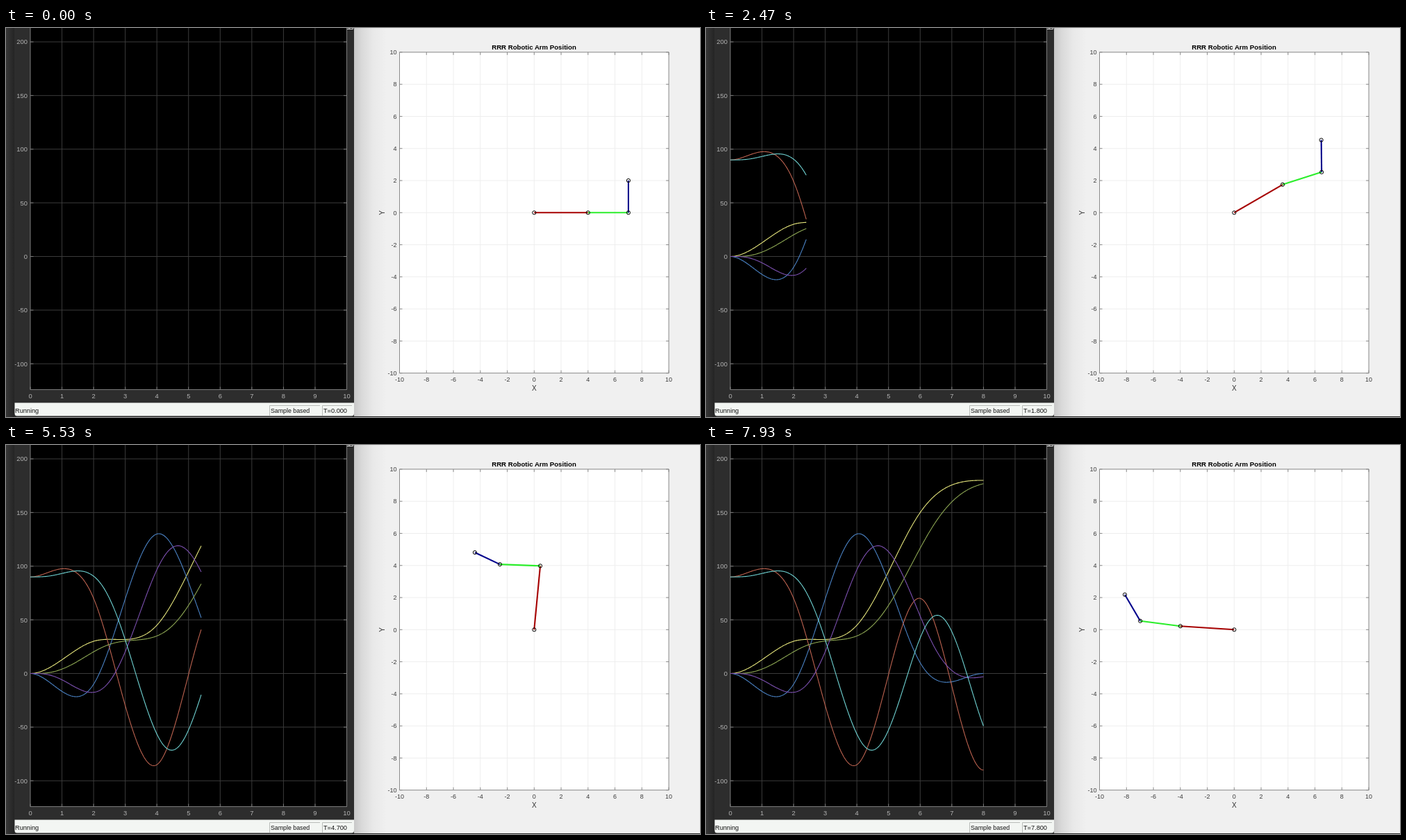
These frames come from a looping animation (999 by 561 pixels, 8000 ms). An HTML page:

```html
<!DOCTYPE html>
<html lang="en">
<head>
<meta charset="utf-8">
<title>Robotic arm simulation</title>
<style>
  html, body { margin: 0; width: 100%; height: 100%; overflow: hidden; background: #f0f0f0; }
  svg { display: block; width: 100vw; height: 100vh; font-family: "Liberation Sans", Arial, sans-serif; }
</style>
</head>
<body>
<svg id="stage" viewBox="0 0 999 561" preserveAspectRatio="none">
  <defs>
    <linearGradient id="edge">
      <stop offset="0" stop-color="#383838"/><stop offset="1" stop-color="#242424"/>
    </linearGradient>
    <linearGradient id="shade">
      <stop offset="0" stop-color="#c6c6c6"/><stop offset=".25" stop-color="#d9d9d9"/>
      <stop offset=".6" stop-color="#e9e9e9"/><stop offset="1" stop-color="#f0f0f0"/>
    </linearGradient>
  </defs>
  <rect width="999" height="561" fill="#f0f0f0"/>
  <rect x="500" width="48" height="561" fill="url(#shade)"/>
  <rect y="560" width="999" height="1" fill="#2a2a2a"/>
  <rect width="501" height="561" fill="#2d2d2d"/>
  <rect width="12" height="561" fill="url(#edge)"/>
  <path d="M12.5 540.5H501V556q0 3.5-3.5 3.5H16q-3.5 0-3.5-3.5z" fill="#f3f6f3"/>
  <path d="M379.500 559V544.500H452M455.500 559V544.500H498" fill="none" stroke="#b9bcb9"/>
  <path d="M488.500 0V1.500H499.500V0M494 0V1.500" fill="none" stroke="#e4e4e4"/>
  <g id="scope"></g>
  <g id="figure"></g>
</svg>
<script>
const LOOP = 8000, DT = 0.01, STIFFNESS = 10, DAMPING = 2 * Math.sqrt(STIFFNESS);
const KNOT_GAP = 2;
const scope = document.getElementById("scope");
const figure = document.getElementById("figure");

function add(parent, tag, attrs, text) {
  const el = document.createElementNS("http://www.w3.org/2000/svg", tag);
  for (const key in attrs) el.setAttribute(key, attrs[key]);
  if (text !== undefined) el.textContent = text;
  parent.appendChild(el);
  return el;
}
const label = (parent, text, x, y, size, fill, anchor = "start", more = {}) =>
  add(parent, "text", { x, y, "font-size": size, fill, "text-anchor": anchor, ...more }, text);
const path = (parent, d, stroke, width = 1) =>
  add(parent, "path", { d, fill: "none", stroke, "stroke-width": width });

// Scope and figure coordinates
const sx = t => 35 + 45.55 * t;
const sy = v => 329.5 - 1.5475 * v;
const fx = x => 760.3 + 19.38 * x;
const fy = y => 266.3 - 23.14 * y;

function drawScope() {
  add(scope, "rect", { x: 35, y: 0, width: 455.5, height: 521.5, fill: "#000" });
  let grid = "", ticks = "";
  for (let t = 0; t <= 10; t++) {
    const x = sx(t);
    if (t % 10) grid += `M${x} 0V521.5`;
    ticks += `M${x} 521.5v-4`;
    label(scope, t, x, 534.3, 9.4, "#b4b4b4", "middle");
  }
  for (let v = -100; v <= 200; v += 50) {
    const y = sy(v);
    grid += `M35 ${y}H490.5`;
    ticks += `M35 ${y}h4.5M490.5 ${y}h-4.5`;
    label(scope, v, 31, y + 3.4, 9.4, "#b4b4b4", "end");
  }
  path(scope, grid, "#3b3b3b");
  path(scope, ticks + "M35 0V521.5H490.5V0", "#7c7c7c");
  label(scope, "Running", 13, 555, 9.2, "#111");
  label(scope, "Sample based", 381, 555, 8.8, "#111");
}

function drawFigure() {
  const [x0, x1, y0, y1] = [fx(-10), fx(10), fy(10), fy(-10)];
  add(figure, "rect", { x: x0, y: y0, width: x1 - x0, height: y1 - y0, fill: "#fff" });
  let grid = "", ticks = "";
  for (let v = -10; v <= 10; v += 2) {
    const x = fx(v), y = fy(v);
    grid += `M${x} ${y0}V${y1}M${x0} ${y}H${x1}`;
    ticks += `M${x} ${y0}v4M${x} ${y1}v-4M${x0} ${y}h4M${x1} ${y}h-4`;
    label(figure, v, x, 510.2, 9, "#3c3c3c", "middle");
    label(figure, v, 562.5, y + 3.3, 9, "#3c3c3c", "end");
  }
  path(figure, grid, "#eeeeee");
  path(figure, ticks + `M${x0} ${y0}H${x1}V${y1}H${x0}z`, "#8a8a8a");
  label(figure, "RRR Robotic Arm Position", 760, 31.2, 9.63, "#000", "middle", { "font-weight": "bold" });
  label(figure, "X", 760.3, 522.5, 10, "#333", "middle");
  label(figure, "Y", 0, 0, 10, "#333", "middle", { transform: "translate(544.5 266.3) rotate(-90)" });
}

// Cubic spline through evenly spaced points, at rest at both ends
function spline(p) {
  const v = p.map(() => 0);
  for (let pass = 0; pass < 40; pass++)
    for (let i = 1; i < p.length - 1; i++)
      v[i] = (3 * (p[i + 1] - p[i - 1]) / KNOT_GAP - v[i - 1] - v[i + 1]) / 4;
  return t => {
    const i = Math.min(Math.floor(t / KNOT_GAP), p.length - 2);
    const s = t / KNOT_GAP - i, r = 1 - s;
    return p[i] * r * r * (1 + 2 * s) + p[i + 1] * s * s * (3 - 2 * s)
      + KNOT_GAP * s * r * (v[i] * r - v[i + 1] * s);
  };
}

// A joint follows its reference as a critically damped PD loop
function makeJoint(points) {
  const target = spline(points), wanted = [], actual = [];
  let q = points[0], speed = 0;
  for (let n = 0; n <= 800; n++) {
    const ref = target(n * DT);
    wanted.push(ref);
    actual.push(q);
    speed += (STIFFNESS * (ref - q) - DAMPING * speed) * DT;
    q += speed * DT;
  }
  return { wanted, actual };
}

const joints = [
  makeJoint([0, 30, 45, 150, 180]),
  makeJoint([0, -10, 130, 10, 0]),
  makeJoint([90, 70, -85, 70, -90])
];

drawScope();
drawFigure();

const curve = (data, color) => ({ data, el: path(scope, "", color, 1.1) });
const curves = [
  ...["#e6e67c", "#4a82c4", "#bd6350"].map((c, i) => curve(joints[i].wanted, c)),
  ...["#8ca653", "#7c50b0", "#6fd2d2"].map((c, i) => curve(joints[i].actual, c))
];
const clock = label(scope, "", 457, 555, 9.2, "#111");
const links = ["#a60000", "#2bee2b", "#00008c"].map(c => path(figure, "", c, 2.1));
const pins = [0, 1, 2, 3].map(() =>
  add(figure, "circle", { r: 2.6, fill: "none", stroke: "#000", "stroke-width": 1 }));
const LENGTHS = [4, 3, 2];

// Playback time (ms) to simulation time (s); the scope stalls twice
const ARM_PACE = [[0, 0], [1400, 1.3], [1730, 1.6], [2470, 2.4], [2600, 2.5], [3470, 3.2],
  [3600, 3.6], [4330, 4.2], [4600, 4.4], [5200, 4.95], [6070, 6.1], [6470, 6.5], [7920, 8], [LOOP, 8]];
const SCOPE_PACE = [[0, 0], [1400, 1.3], [1730, 1.6], [2470, 2.4], [2600, 2.5], [3470, 3.2],
  [3630, 3.2], [3670, 3.6], [4330, 4.2], [4600, 4.4], [5200, 4.95], [6070, 6.1], [6150, 6.2],
  [6500, 6.2], [6540, 6.6], [7920, 8], [LOOP, 8]];
const CLOCK_TIMES = [0, 0.7, 1.8, 2.6, 3.7, 4.7, 5.6, 6.7, 7.8];

// Sample index, in whole tenths of a second
function sampleAt(pace, ms) {
  const i = pace.findIndex(k => k[0] > ms);
  const [a, b] = [pace[i - 1], pace[i]];
  const t = a[1] + (b[1] - a[1]) * (ms - a[0]) / (b[0] - a[0]);
  return Math.floor(t * 10 + 0.25) * 10;
}

function render(ms) {
  const end = sampleAt(SCOPE_PACE, ms), now = sampleAt(ARM_PACE, ms);
  for (const { data, el } of curves) {
    let d = "";
    for (let n = 0; end && n <= end; n += 2)
      d += (n ? "L" : "M") + sx(n * DT).toFixed(2) + " " + sy(data[n]).toFixed(2);
    el.setAttribute("d", d);
  }
  clock.textContent = "T=" + CLOCK_TIMES.filter(t => t * 100 <= end + 1).pop().toFixed(3);

  let x = 0, y = 0, angle = 0;
  pins.forEach((pin, i) => {
    pin.setAttribute("cx", fx(x));
    pin.setAttribute("cy", fy(y));
    if (i === LENGTHS.length) return;
    const from = `M${fx(x)} ${fy(y)}`;
    angle += joints[i].actual[now] * Math.PI / 180;
    x += LENGTHS[i] * Math.cos(angle);
    y += LENGTHS[i] * Math.sin(angle);
    links[i].setAttribute("d", `${from}L${fx(x)} ${fy(y)}`);
  });
}

const start = performance.now();
function tick() {
  render((performance.now() - start) % LOOP);
  requestAnimationFrame(tick);
}
tick();
</script>
</body>
</html>
```
